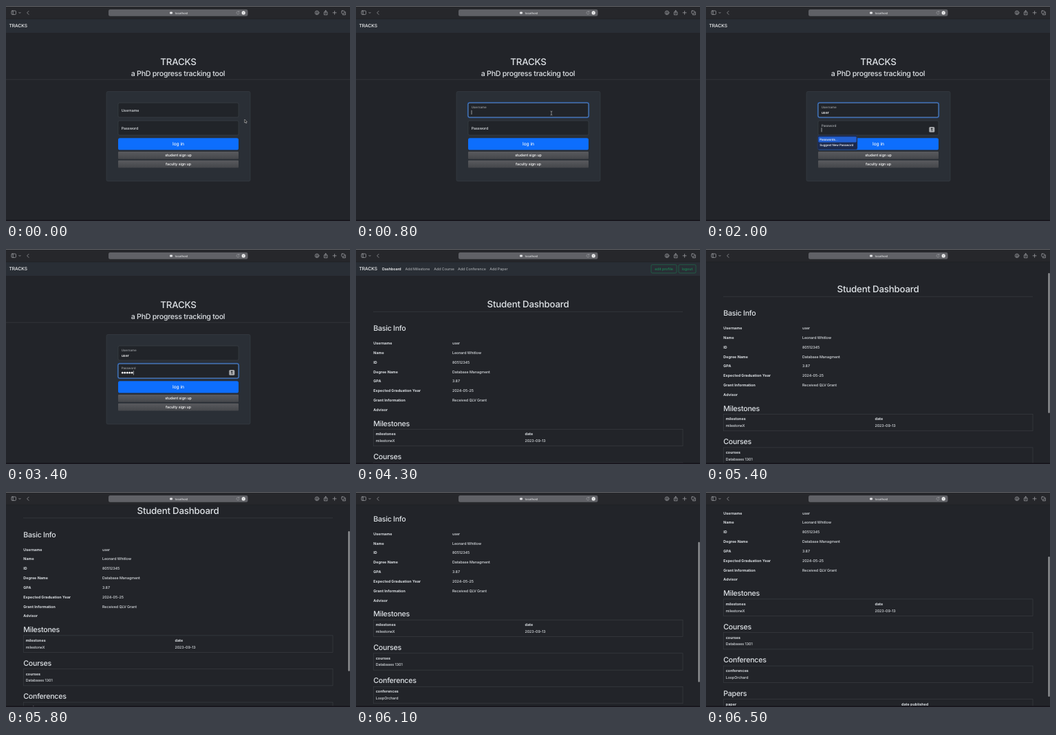
Recreate the animation shown at these times as an HTML page. Size 500x313 px, loop 6.6 s.

```html
<!DOCTYPE html>
<html lang="en">
<head>
<meta charset="utf-8">
<title>TRACKS</title>
<style>
  html, body { margin: 0; width: 100%; height: 100%; overflow: hidden; background: #222429; }
  svg { display: block; width: 100vw; height: 100vh; }
  text {
    font: 500 5.33px Inter, "Open Sans", sans-serif; letter-spacing: -.01em;
    fill: #dee2e6; white-space: pre; text-rendering: geometricPrecision;
  }
  .h1 { font-size: 13.33px; letter-spacing: -.018em; }
  .h2 { font-size: 10.67px; letter-spacing: -.026em; }
  .mid { text-anchor: middle; }
  .bold { font-weight: 700; letter-spacing: .008em; }
  .brand { font-size: 6.67px; fill: #f4f5f6; }
  .link { fill: #a4a7ab; }
  .active { fill: #f4f5f6; font-weight: 600; }
  .green { fill: #198754; }
  .small { font-size: 4.4px; fill: #fff; }
  .url { font-size: 4.25px; fill: #e2e3e5; }
  .white { fill: #fff; }
  .line { fill: none; stroke: #3d4045; stroke-width: .6; }
  .field { fill: #212429; stroke: #43494f; stroke-width: .5; }
  .outline { fill: none; stroke: #198754; stroke-width: .5; }
  .icon { fill: none; stroke: #a8aaae; stroke-width: .7; stroke-linecap: round; stroke-linejoin: round; }
  .caret { fill: #e8eaed; }
</style>
</head>
<body>
<svg viewBox="0 0 500 313" preserveAspectRatio="none">
  <defs>
    <linearGradient id="grey" x2="0" y2="1">
      <stop stop-color="#595a5e"/><stop offset="1" stop-color="#45474b"/>
    </linearGradient>
  </defs>
  <rect width="500" height="313" fill="#222429"/>

  <g id="page">
    <rect y="19" width="500" height="20" fill="#292e35"/>
    <text x="4.5" y="30.9" class="brand">TRACKS</text>

    <g id="login">
      <text x="250.5" y="85.5" class="h1 mid">TRACKS</text>
      <text x="250" y="102" class="h2 mid">a PhD progress tracking tool</text>
      <path d="M0 107H500" class="line"/>
      <rect x="146" y="124.5" width="209" height="130.5" rx="2" fill="#2a2f36" stroke="#3b4047" stroke-width=".6"/>
      <g id="fields"></g>
      <rect x="163" y="192.3" width="175" height="17.2" rx="2.6" fill="#0d6efd"/>
      <text x="250.5" y="203.3" class="brand mid">log in</text>
      <rect x="163" y="212" width="175" height="10.8" rx="1" fill="url(#grey)"/>
      <text x="250.5" y="219.3" class="mid white">student sign up</text>
      <rect x="163" y="224.8" width="175" height="10.6" rx="1" fill="url(#grey)"/>
      <text x="250.5" y="232" class="mid white">faculty sign up</text>

      <g id="key">
        <rect x="324.3" y="176" width="8" height="7.8" rx="1.6" fill="#a9abae"/>
        <path d="M328.2 179.6V182.2M328.2 181.2H329.4" fill="none" stroke="#2a2d31" stroke-width=".8"/>
        <circle cx="328.2" cy="178.6" r="1.2" fill="#2a2d31"/>
      </g>
      <text id="name" x="167.7" y="156.9" class="white"></text>
      <g id="dots" class="white"></g>
      <rect id="caret" class="caret" width=".6" height="6.2"/>
      <g id="menu">
        <rect x="162" y="188" width="58" height="21" rx="2.2" fill="#1c2a4e" stroke="#39476a" stroke-width=".4"/>
        <rect x="163.3" y="190.2" width="55.4" height="8.2" rx="1.3" fill="#2260d2"/>
        <text x="165.3" y="195.9" class="small">Passwords...</text>
        <text x="165.3" y="203.6" class="small">Suggest New Password</text>
      </g>
    </g>

    <g id="dash">
      <g id="links"></g>
      <rect x="429" y="22.8" width="37" height="12.2" rx="1.8" class="outline"/>
      <text x="447.5" y="30.9" class="mid green">edit profile</text>
      <rect x="469" y="22.8" width="25" height="12.2" rx="1.8" class="outline"/>
      <text x="481.3" y="30.9" class="mid green">logout</text>
      <text x="250" y="85.3" class="h1 mid">Student Dashboard</text>
      <path d="M25 91.3H475" class="line"/>
      <text x="25.3" y="119.2" class="h2">Basic Info</text>
      <g id="info"></g>
      <g id="tables"></g>
    </g>
  </g>

  <g id="browser">
    <rect width="500" height="19" fill="#26272b"/>
    <rect width="500" height=".9" fill="#6b6c70"/>
    <path d="M0 18.8H500" stroke="#1b1c1f" stroke-width=".5"/>
    <rect x="149" y="5" width="202.5" height="9.8" rx="2.4" fill="#606166"/>
    <rect x="238" y="8.4" width="4" height="3.2" rx="1" fill="#e2e3e5"/>
    <text x="246" y="11.5" class="url">localhost</text>
    <g class="icon">
      <path id="reload" d="M338.8 8.6A2.1 2.1 0 1 0 339.1 10.6M338.9 7.3V8.8H337.4" stroke-width=".5"/>
      <path id="stop" d="M335.6 8.4L338.8 11.6M338.8 8.4L335.6 11.6" stroke-width=".5"/>
      <rect x="8" y="7" width="6.4" height="5.4" rx="1"/>
      <path d="M10.2 7V12.4M18.8 9.3L20 10.5L21.2 9.3M33 7.4L30.6 9.9L33 12.4"/>
      <circle cx="452" cy="9.8" r="2.8"/>
      <path d="M452 8.2V11.2M450.9 10.2L452 11.3L453.1 10.2"/>
      <path d="M463.6 8.8H462.4V12.8H467V8.8H465.8M464.7 11V6.6M463.4 7.8L464.7 6.5L466 7.8"/>
      <path d="M477.6 7.3V12.3M475.1 9.8H480.1"/>
      <rect x="487.8" y="7" width="4" height="4" rx=".8"/>
      <path d="M493 8.6H493.4V12.8H489.4V12.2"/>
    </g>
    <circle cx="345.2" cy="9.9" r="2.6" fill="#ecedee"/>
    <circle cx="345.2" cy="9.9" r=".7" fill="#85868a"/>
  </g>

  <rect id="thumb" x="497.4" width="2.2" height="204" rx="1.1" fill="#98999c"/>
  <path id="arrow" d="M0 0V5L1.2 4L2 5.8L2.9 5.4L2.1 3.7H3.6Z" fill="#111" stroke="#e6e6e6" stroke-width=".5"/>
  <path id="beam" d="M-1 -3Q0 -3 0 -2V2Q0 3 -1 3M1 -3Q0 -3 0 -2M0 2Q0 3 1 3" class="icon" stroke-width=".6"/>
  <rect y="311.4" width="500" height="1.6" fill="#17141c"/>
</svg>

<script>
const LOOP = 6600, STEP = 100;
const $ = id => document.getElementById(id);

function add(parent, tag, attrs, label) {
  const el = document.createElementNS("http://www.w3.org/2000/svg", tag);
  for (const k in attrs) el.setAttribute(k, attrs[k]);
  if (label) el.textContent = label;
  parent.appendChild(el);
  return el;
}
const write = (parent, x, y, label, cls = "") =>
  add(parent, "text", { x, y, class: cls }, label);

function makeField(top, label) {
  const g = $("fields");
  const box = { x: 163, y: top, width: 175, height: 21, rx: 2 };
  add(g, "rect", { ...box, class: "field" });
  const ring = add(g, "g", { fill: "none" });
  add(ring, "rect", { x: 162.4, y: top - .6, width: 176.2, height: 22.2, rx: 2.5,
    stroke: "#0d6efd", "stroke-opacity": .4, "stroke-width": 1.3 });
  add(ring, "rect", { ...box, stroke: "#6fa5f3", "stroke-width": .7 });
  return { top, ring, label: write(g, 167.7, 0, label) };
}
const user = makeField(141, "Username");
const pass = makeField(167, "Password");

function setField(f, lift, glow) {
  f.ring.setAttribute("opacity", glow);
  f.label.setAttribute("y", f.top + 12.8 - 5.1 * lift);
  f.label.style.fontSize = 5.33 - .8 * lift + "px";
  f.label.setAttribute("opacity", 1 - .35 * lift);
}

for (let i = 0; i < 5; i++) add($("dots"), "circle", { cx: 169.3 + 3.45 * i, cy: 180.2, r: 1.35 });

[[38, "Dashboard"], [71.5, "Add Milestone"], [113.3, "Add Course"], [148, "Add Conference"], [194.3, "Add Paper"]]
  .forEach(([x, s], i) => write($("links"), x, 30.9, s, i ? "link" : "active"));

[["Username", "user"], ["Name", "Leonard Whitlow"], ["ID", "80512345"],
 ["Degree Name", "Database Managment"], ["GPA", "3.87"],
 ["Expected Graduation Year", "2024-05-25"],
 ["Grant Information", "Received QLV Grant"], ["Advisor", ""]]
  .forEach(([k, v], i) => {
    const y = 139 + 13.85 * i;
    write($("info"), 25.3, y, k, "bold");
    write($("info"), 140, y, v);
  });

// title, first column, its value, then x, name and value of the second column
[["Milestones", "milestones", "milestoneX", 245.5, "date", "2023-09-13"],
 ["Courses", "courses", "Databases 1301"],
 ["Conferences", "conferences", "LoopOrchard"],
 ["Papers", "paper", "", 284, "date published", ""]]
  .forEach(([title, head, cell, x2, head2, cell2], i) => {
    const g = $("tables"), y = 257.5 + 48.6 * i;
    write(g, 25.3, y, title, "h2");
    add(g, "rect", { x: 25.5, y: y + 4.9, width: 449.5, height: 24.4, class: "line" });
    write(g, 28.7, y + 13.9, head, "bold");
    write(g, 28.7, y + 23.6, cell);
    if (x2) {
      write(g, x2, y + 13.9, head2, "bold");
      write(g, x2, y + 23.6, cell2);
    }
  });

const ramp = (t, a, b) => Math.min(1, Math.max(0, (t - a) / (b - a)));
const show = (id, on) => $(id).style.display = on ? "" : "none";
const move = (id, x, y) => $(id).setAttribute("transform", `translate(${x} ${y})`);
const count = (t, times) => times.filter(at => t >= at).length;

const scrollKeys = [[5100, 0], [5200, 5], [5400, 22], [5800, 53.5], [6500, 106.5]];
function scrollAt(t) {
  let y = 0;
  for (let i = 1; i < scrollKeys.length; i++) {
    const [a, from] = scrollKeys[i - 1], [b, to] = scrollKeys[i];
    y += (to - from) * ramp(t, a, b);
  }
  return y;
}

function render(t) {
  const inside = t >= 4000;
  show("login", !inside);
  show("dash", inside);

  // pointer: travels to the first field, turns into a beam, hides on typing
  const p = ramp(t, 100, 500), go = p * p * (3 - 2 * p);
  const px = 346.8 - 62.8 * go, py = 165 - 9 * go;
  const over = px < 338 && py < 163;
  show("arrow", t < 1300 && !over);
  show("beam", t < 1300 && over);
  move("arrow", px, py);
  move("beam", px, py);

  const swap = ramp(t, 2000, 2200);
  setField(user, ramp(t, 500, 700), ramp(t, 500, 700) * (1 - swap));
  setField(pass, ramp(t, 1925, 2025), swap);
  show("key", t >= 2000);
  show("menu", t >= 2000 && t < 2300);

  const name = $("name");
  name.textContent = "user".slice(0, count(t, [1300, 1400, 1500, 1600]));
  const dots = count(t, [2500, 2600, 2700, 2700, 3400]);
  [...$("dots").children].forEach((d, i) => d.style.display = i < dots ? "" : "none");

  const second = t >= 2000;
  const end = name.textContent ? name.getComputedTextLength() + .4 : 0;
  $("caret").setAttribute("x", second ? 167.7 + 3.45 * dots : 167.7 + end);
  $("caret").setAttribute("y", second ? 177.2 : 151.7);
  $("caret").setAttribute("opacity", second
    ? (t < 3400 ? 1 - ramp(t, 3000, 3200) : 1)
    : +(t >= 700 && t < 1700));

  const loading = t >= 3900 && t < 4300;
  show("reload", !loading);
  show("stop", loading);

  const y = scrollAt(t);
  move("page", 0, -y);
  show("thumb", y > 0);
  $("thumb").setAttribute("y", 19.5 + .7 * y);
}

function tick() {
  render(Math.floor(performance.now() % LOOP / STEP) * STEP);
  requestAnimationFrame(tick);
}
tick();
</script>
</body>
</html>
```
